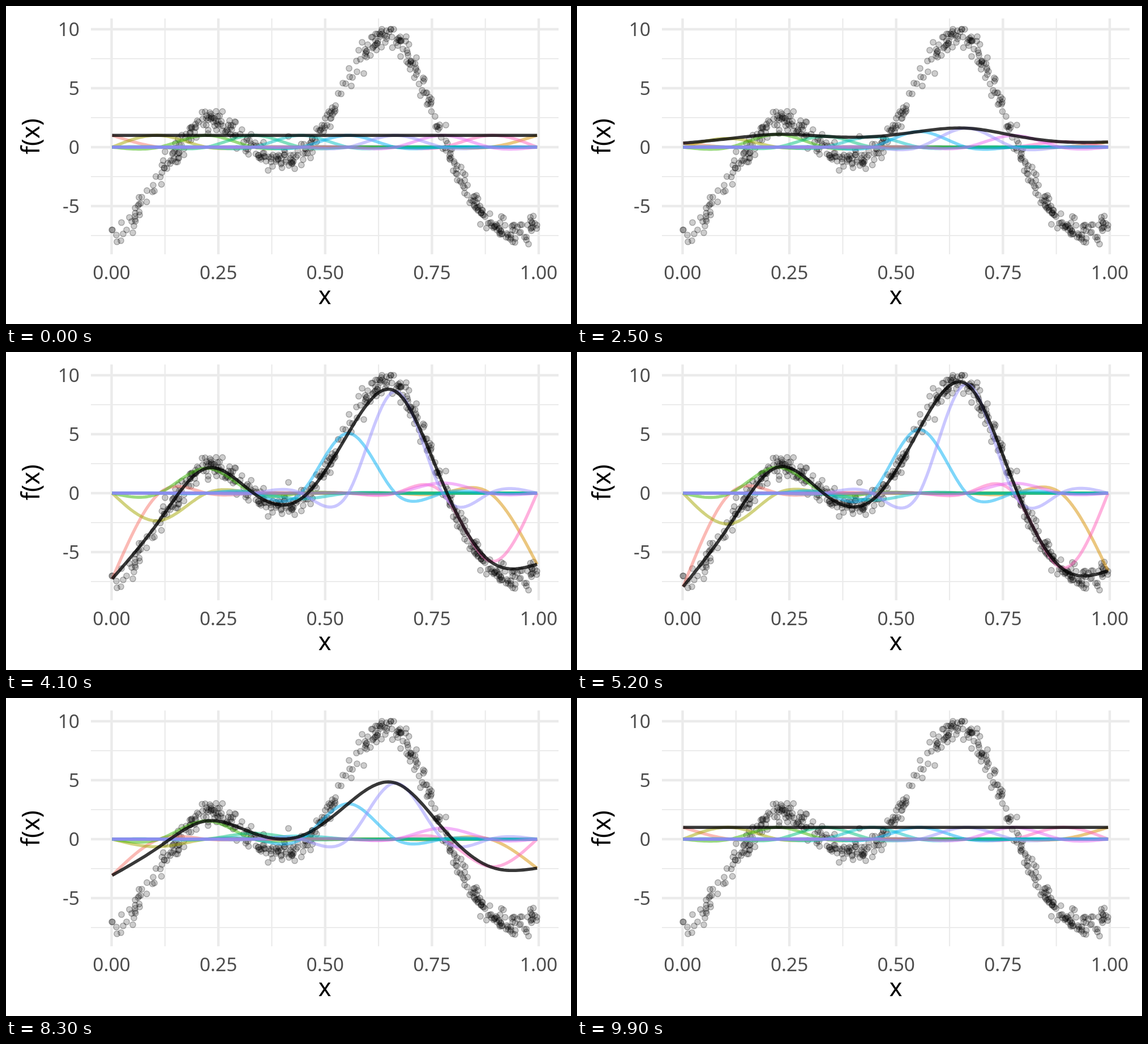
An HTML page that plays this animation: 998 px wide and 561 px high, repeating every 10 s.

```html
<!DOCTYPE html>
<html lang="en">
<head>
<meta charset="utf-8">
<title>Spline basis</title>
<style>
  html, body { margin: 0; height: 100%; overflow: hidden; background: #fff; }
  svg { display: block; width: 100%; height: 100%; }
  text { font-family: "Noto Sans", "Open Sans", sans-serif; text-anchor: middle; }
  .tick { font-size: 33.5px; fill: #4d4d4d; }
  .side { text-anchor: end; }
  .title { font-size: 43px; }
  #grid path { stroke: #ebebeb; }
  #points circle { fill: #000; fill-opacity: .2; stroke: #000; stroke-opacity: .3; stroke-width: 1.3; }
  #lines path { fill: none; stroke-width: 5.4; stroke-opacity: .5; stroke-linejoin: round; }
  #lines .sum { stroke: #000; stroke-opacity: .78; stroke-width: 5.6; }
</style>
</head>
<body>
<svg viewBox="0 0 998 561">
  <g id="grid"></g>
  <g id="points"></g>
  <g id="lines"></g>
  <g id="labels">
    <text class="title" x="563" y="526">x</text>
    <text class="title" transform="translate(59 230) rotate(-90)">f(x)</text>
  </g>
</svg>
<script>
const $ = id => document.getElementById(id);
function add(parent, tag, attrs, text = '') {
  const el = document.createElementNS('http://www.w3.org/2000/svg', tag);
  for (const k in attrs) el.setAttribute(k, attrs[k]);
  el.textContent = text;
  return parent.appendChild(el);
}
const px = x => 186.5 + 754.5 * x;
const py = y => 249 - 20.8 * y;

// Axes: minor grid first, major grid on top
const vLine = (x, w) => add($('grid'), 'path', { d: `M${px(x)} 22V438`, 'stroke-width': w });
const hLine = (y, w) => add($('grid'), 'path', { d: `M150 ${py(y)}H976`, 'stroke-width': w });
for (let i = 0; i < 4; i++) {
  vLine(.125 + i / 4, 2.2);
  hLine(-7.5 + 5 * i, 2.2);
}
for (let i = 0; i < 5; i++) {
  vLine(i / 4, 4.4);
  add($('labels'), 'text', { class: 'tick', x: px(i / 4), y: 482 }, (i / 4).toFixed(2));
}
for (let y = -5; y <= 10; y += 5) {
  hLine(y, 4.4);
  add($('labels'), 'text', { class: 'tick side', x: 130, y: py(y) + 12 }, y);
}

// Natural cubic spline through values at evenly spaced knots 0, 1, 2 ...
function spline(v) {
  const m = v.map(() => 0);
  for (let pass = 0; pass < 40; pass++)
    for (let i = 1; i < v.length - 1; i++)
      m[i] = (6 * (v[i - 1] - 2 * v[i] + v[i + 1]) - m[i - 1] - m[i + 1]) / 4;
  return u => {
    const i = Math.min(Math.floor(u), v.length - 2), b = u - i, a = 1 - b;
    return a * v[i] + b * v[i + 1] + ((a ** 3 - a) * m[i] + (b ** 3 - b) * m[i + 1]) / 6;
  };
}
const fitted = [-7.93, -2.6, 2.2, -.1, -.6, 5.4, 9.25, .85, -6.3, -6.6];
const LEFT = 187.5, STEP = 83.4, SAMPLES = 180;
const curve = spline(fitted);

// Scatter: stray points by place, the rest as noise around the curve
let seed = 11;
const rnd = () => (seed = seed * 16807 % 2147483647) / 2147483647;
const dot = (cx, cy) => add($('points'), 'circle', { cx, cy, r: 5.2 });
const strays = [
  187,395, 188,395, 195,404, 196,416, 203,414, 204,382, 207,402, 213,395, 224,400, 218,373,
  222,380, 228,371, 226,388, 281,257, 360,188, 368,198, 463,290, 499,230, 510,287, 538,268,
  595,136, 600,137, 592,155, 606,110, 607,125, 612,126, 610,141, 619,97, 620,116, 623,78,
  626,94, 629,64, 632,119, 664,41, 680,41, 663,45, 697,89, 707,54, 706,62, 725,91,
  732,158, 739,129, 777,210, 804,311, 807,294, 810,330, 923,420, 899,417, 895,416];
for (let i = 0; i < strays.length; i += 2) dot(strays[i], strays[i + 1]);
for (let i = 0; i < 455; i++) {
  const x = 228 + 710 * rnd(), noise = (rnd() + rnd() + rnd() - 1.5) * .95;
  const gap = (x > 251 && x < 257) || (x > 587 && x < 634);
  if (!gap) dot(x, Math.max(41, py(curve((x - LEFT) / STEP) + noise)));
}

// Basis functions, listed in painting order
const colors = { 0: '#f8766d', 9: '#d89000', 8: '#ff62bc', 1: '#a3a500', 2: '#39b600',
  3: '#00bf7d', 4: '#00bfc4', 5: '#00b0f6', 7: '#e76bf3', 6: '#9590ff' };
const bases = [0, 9, 8, 1, 2, 3, 4, 5, 7, 6].map(k => ({
  k, f: spline(fitted.map((_, i) => +(i === k))),
  el: add($('lines'), 'path', { stroke: colors[k] })
}));
const sum = add($('lines'), 'path', { class: 'sum' });

function trace(el, f) {
  let d = '';
  for (let i = 0; i <= SAMPLES; i++) {
    const u = 9 * i / SAMPLES;
    d += (i ? 'L' : 'M') + (LEFT + STEP * u).toFixed(2) + ' ' + py(f(u)).toFixed(2);
  }
  el.setAttribute('d', d);
}
function ease(p) {
  p = Math.min(1, Math.max(0, p));
  return p < .5 ? 4 * p ** 3 : 1 - 4 * (1 - p) ** 3;
}
let shown = -1;
function frame(now) {
  const t = Math.floor(now % 10000 / 100) * 100;
  if (t !== shown) {
    shown = t;
    const fit = ease((t - 1600) / 3400) - ease((t - 6600) / 3300);
    const weights = fitted.map(w => 1 + (w - 1) * fit);
    for (const { k, f, el } of bases) trace(el, u => weights[k] * f(u));
    trace(sum, spline(weights));
  }
  requestAnimationFrame(() => frame(performance.now() - start));
}
const start = performance.now();
frame(0);
</script>
</body>
</html>
```
